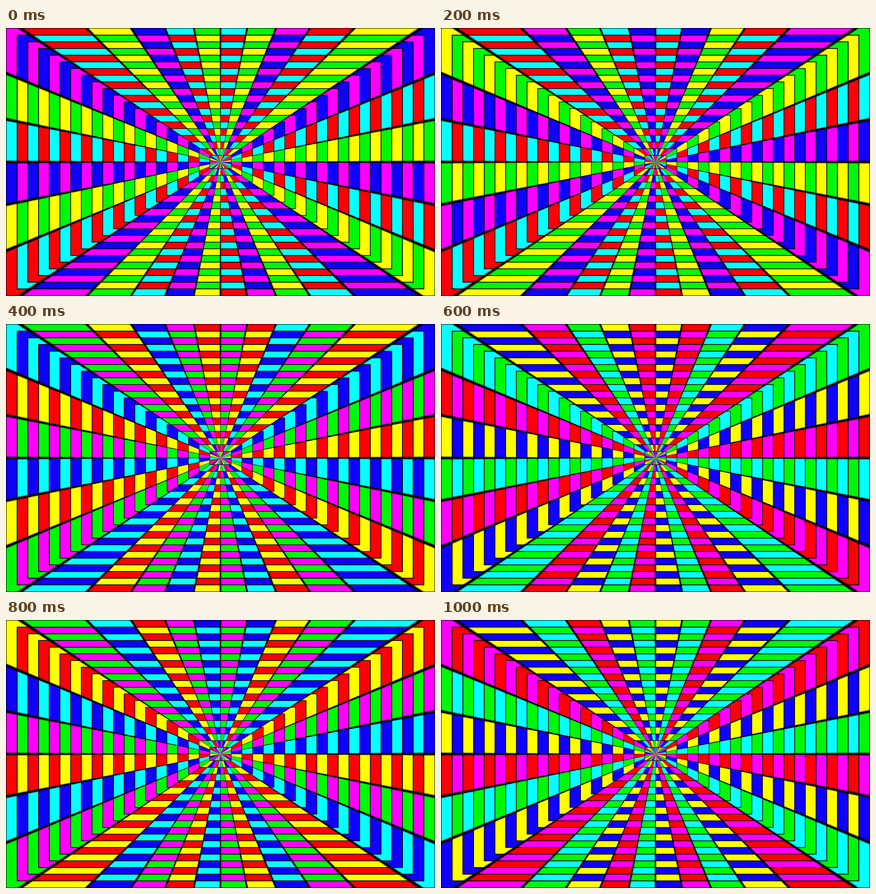
Animation of 947x592 px, one loop 1.2 s. Source, as an HTML page with a canvas:

```html
<!DOCTYPE html>
<html lang="en">
<head>
<meta charset="utf-8">
<title>Colour tunnel</title>
<style>
  html, body { margin: 0; width: 100%; height: 100%; overflow: hidden; background: #000; }
  canvas { display: block; }
</style>
</head>
<body>
<canvas id="stage" width="947" height="592"></canvas>
<script>
const ctx = document.getElementById('stage').getContext('2d');
const CX = 473.5, CY = 296, HALF_W = 472.5, HALF_H = 295;
const RINGS = 20, SECTORS = 32, STEP = 2 * Math.PI / SECTORS;
const HOLD = 200;

const COLORS = {
  r: '#ff0008', g: '#00f808', b: '#1000ff',
  c: '#08ffff', m: '#ff00ff', y: '#ffff00'
};

// Each palette holds three pairs, repeated clockwise; a pair alternates by ring.
const PALETTES = [
  ['cr', 'yg', 'mb'],
  ['cr', 'mb', 'yg'],
  ['mg', 'yr', 'cb'],
  ['yb', 'mr', 'cg'],
  ['mg', 'cb', 'yr'],
  ['yb', 'cg', 'mr']
];

// Triangle from the centre between two angles, measured clockwise from the top.
function wedge(a, b, color) {
  const far = 700;
  ctx.beginPath();
  ctx.moveTo(0, 0);
  ctx.lineTo(far * Math.sin(a), -far * Math.cos(a));
  ctx.lineTo(far * Math.sin(b), -far * Math.cos(b));
  ctx.fillStyle = color;
  ctx.fill();
}

function drawRing(k, palette) {
  const size = 1 - k / RINGS, w = HALF_W * size, h = HALF_H * size;
  ctx.save();
  ctx.beginPath();
  ctx.rect(-w, -h, 2 * w, 2 * h);
  ctx.clip();
  for (let s = 0; s < SECTORS; s++) {
    wedge(s * STEP, (s + 1) * STEP, COLORS[palette[s % 3][(s + k) % 2]]);
  }
  ctx.restore();
  if (k) {
    ctx.lineWidth = 1 + 0.9 * size;
    ctx.strokeStyle = '#000';
    ctx.strokeRect(-w, -h, 2 * w, 2 * h);
  }
}

function drawSpokes() {
  const soft = 0.0085, core = 0.005;
  for (let s = 0; s < SECTORS; s++) {
    const a = s * STEP;
    wedge(a - soft, a + soft, 'rgba(0,0,0,.4)');
    wedge(a - core, a + core, '#000');
  }
}

function draw(palette) {
  ctx.setTransform(1, 0, 0, 1, CX, CY);
  for (let k = 0; k < RINGS; k++) drawRing(k, palette);
  drawSpokes();
  ctx.setTransform(1, 0, 0, 1, 0, 0);
  ctx.lineWidth = 1;
  ctx.strokeStyle = '#000';
  ctx.strokeRect(0.5, 0.5, 946, 591);
}

let shown = -1;
function tick(now) {
  const i = Math.floor(now / HOLD) % PALETTES.length;
  if (i !== shown) draw(PALETTES[shown = i]);
  requestAnimationFrame(tick);
}
requestAnimationFrame(tick);
</script>
</body>
</html>
```
